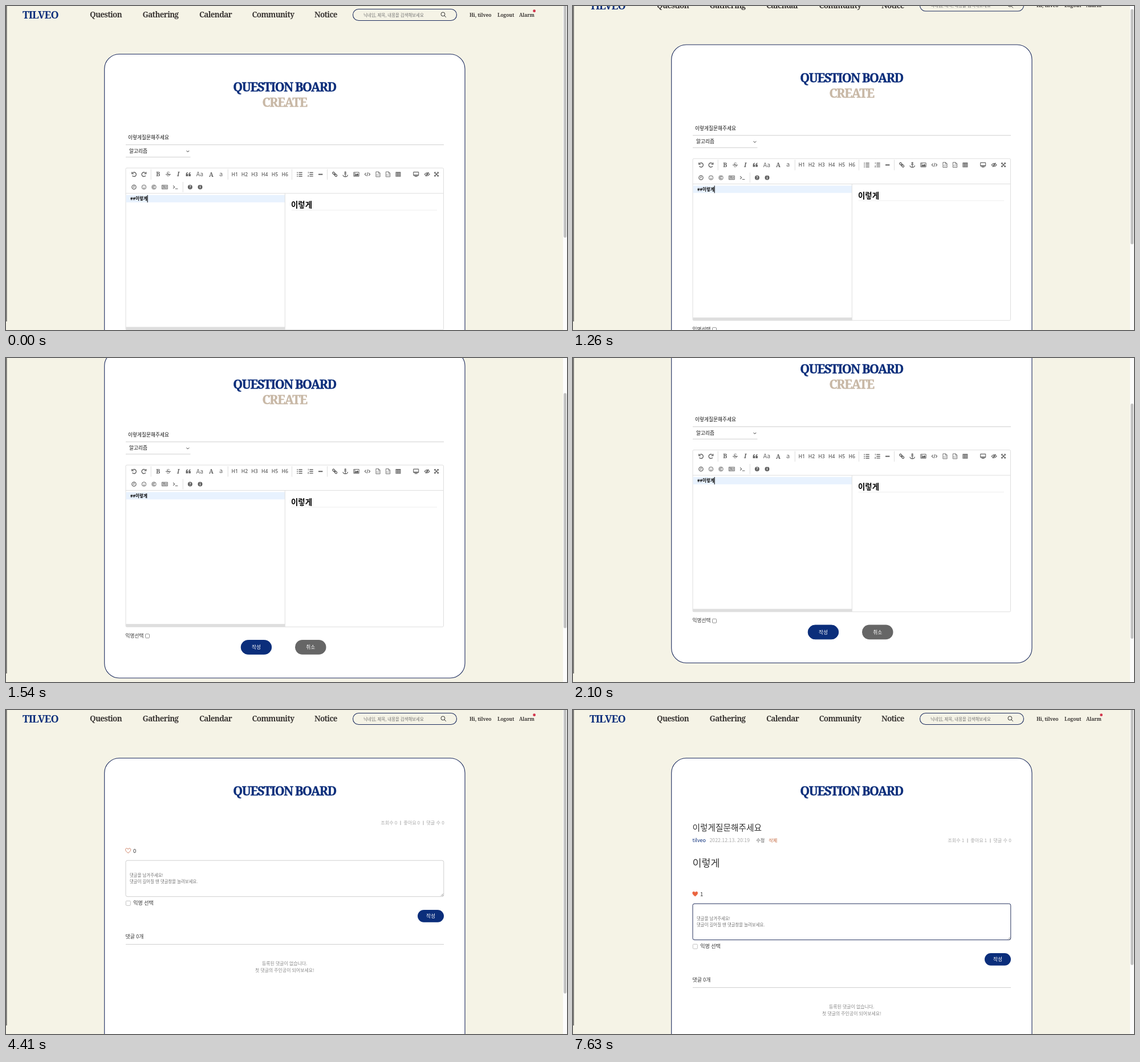
An HTML page for the animation above (8 s loop, 984 by 569 pixels).

```html
<!DOCTYPE html>
<html lang="ko">
<head>
<meta charset="utf-8">
<title>Question board</title>
<style>
@property --scroll { syntax: "<number>"; inherits: true; initial-value: 0; }
:root { --navy: #0b2e7b; --ink: #3b3735; --rule: #cfcfcf; --loop: 8s step-end infinite; }
html, body { margin: 0; width: 100%; height: 100%; overflow: hidden; background: #f5f3e6; }
svg { display: block; width: 984px; height: 569px; animation: scroll var(--loop); }
text { font-family: "Noto Sans CJK KR", "Noto Sans CJK", "Noto Sans", sans-serif; white-space: pre; }

/* type */
.slab text, text.slab { font-family: "Noto Serif", serif; font-weight: 700; fill: var(--ink); }
.nav text { font-size: 13.5px; letter-spacing: -.68px; }
.user text { font-size: 8.5px; letter-spacing: -.1px; }
text.logo { font-size: 18px; letter-spacing: -.95px; fill: var(--navy); }
text.head { font-size: 21.5px; letter-spacing: -1.4px; text-anchor: middle; fill: var(--navy); stroke: var(--navy); stroke-width: .4px; }
text.sub { fill: #c8b8a6; stroke: #c8b8a6; }
.t7 { font-size: 7.42px; fill: #757575; }
.t8 { font-size: 8.7px; fill: #111; }
.meta { font-size: 8.2px; fill: #a9a9a9; }
.empty { font-size: 7.9px; fill: #8a8a8a; text-anchor: middle; }
.mid { text-anchor: middle; }
.bold { font-weight: 700; }

/* shapes */
.line { fill: none; stroke: var(--rule); }
.frame { fill: none; stroke: #dedede; }
.edge { stroke: #1c2b5e; stroke-width: 1.1px; }
.icons { fill: none; stroke: #636363; stroke-width: 1.1px; }
.icons .f { fill: #636363; stroke: none; }
.icons .w { fill: #fff; stroke: none; font-size: 6.5px; font-weight: 700; text-anchor: middle; }
.icons text.f { text-anchor: middle; }
.icons .s { font-family: "Noto Serif", serif; font-size: 10.5px; }
.icons .h text { font: 600 8.6px "Open Sans", "Noto Sans", sans-serif; fill: #636363; stroke: none; text-anchor: middle; }

/* motion */
.page { transform: translateY(calc(-1px * var(--scroll))); }
.thumb { fill: #c1c1c1; transform: translateY(calc(.7px * var(--scroll))); animation: thumb var(--loop); }
.write { animation: write var(--loop); }
.read { animation: read var(--loop); }
.loaded { animation: loaded var(--loop); }
.counts { animation: counts var(--loop); }
.lower { animation: lower var(--loop); }
.caret { animation: caret var(--loop); }
.box { fill: #fff; stroke: #767676; stroke-width: .8px; animation: box var(--loop); }
.tick { animation: tick var(--loop); }
.submit { fill: var(--navy); stroke: var(--navy); animation: submit var(--loop); }
.submit-label { fill: #fff; animation: label var(--loop); }
.before { animation: before var(--loop); }
.after { animation: after var(--loop); }
.area { fill: #fff; stroke: #cfcfcf; animation: area var(--loop); }
.caret2 { animation: caret2 var(--loop); }

@keyframes scroll {
  0% { --scroll: 0; } 14.875% { --scroll: 5; } 15.75% { --scroll: 16.5; } 16.625% { --scroll: 37; }
  17.5% { --scroll: 59; } 18.375% { --scroll: 80; } 19.25% { --scroll: 96.5; } 20.125% { --scroll: 112; }
  21% { --scroll: 123; } 55.125%, 100% { --scroll: 0; }
}
@keyframes thumb { 0% { height: 413px; } 55.125% { height: 504px; } 69.125%, 100% { height: 454px; } }
@keyframes write { 0% { visibility: visible; } 55.125%, 100% { visibility: hidden; } }
@keyframes read { 0% { opacity: 0; } 55.125%, 100% { opacity: 1; } }
@keyframes loaded { 0% { opacity: 0; } 69.125%, 100% { opacity: 1; } }
@keyframes counts { 0% { transform: translateY(-31px); } 69.125%, 100% { transform: none; } }
@keyframes lower { 0% { transform: translateY(-76px); } 69.125%, 100% { transform: none; } }
@keyframes caret {
  0%, 9.625%, 23.625% { opacity: 1; }
  2.625%, 16.625%, 28.875%, 100% { opacity: 0; }
}
@keyframes box {
  0%, 26.25%, 44.625%, 100% { stroke: #767676; fill: #fff; }
  25.375%, 30.625%, 41.125% { stroke: #4f4f4f; fill: #fff; }
  34.125% { stroke: #0067e0; fill: #0067e0; }
  35% { stroke: #005cc8; fill: #005cc8; }
}
@keyframes tick { 0%, 41.125%, 100% { opacity: 0; } 34.125% { opacity: 1; } }
@keyframes submit { 0% { fill: #0b2e7b; } 49% { fill: #3d5895; } 49.875% { fill: #b4bfd6; } 50.75%, 100% { fill: #fff; } }
@keyframes label { 0% { fill: #fff; } 49% { fill: #ccd4e4; } 49.875% { fill: #546ca2; } 50.75%, 100% { fill: #0b2e7b; } }
@keyframes before { 0% { opacity: 1; } 84.875%, 100% { opacity: 0; } }
@keyframes after { 0% { opacity: 0; } 84.875%, 100% { opacity: 1; } }
@keyframes area { 0% { stroke: #cfcfcf; } 89.25% { stroke: #a3a9bb; } 90.125% { stroke: #5f6b8e; } 91%, 100% { stroke: #26335f; } }
@keyframes caret2 { 0%, 95.375%, 100% { opacity: 0; } 89.25% { opacity: 1; } }
</style>
</head>
<body>
<svg viewBox="0 0 984 569">
  <defs>
    <path id="undo" d="M-2.6-2.2A3.7 3.7 0 1 1-2.9 2.3M-3.7-4v3.1h3.1" stroke-width="1.4"/>
    <path id="heart" d="M0 4.2C-6.5-.3-4.9-4.1-2.4-4.1-1-4.1 0-3 0-2.3 0-3 1-4.1 2.4-4.1 4.9-4.1 6.5-.3 0 4.2Z"/>
    <g id="file">
      <path d="M-3.6-4.4H1.2L3.6-2V4.4H-3.6ZM1-4.2V-1.8H3.4" stroke-width=".9"/>
      <path d="M-.7-.4-2 1.2-.7 2.8M.7-.4 2 1.2.7 2.8" stroke-width=".8"/>
    </g>
  </defs>

  <g class="page">
    <g class="slab">
      <text class="logo" x="29" y="22">TILVEO</text>
      <g class="nav">
        <text x="147" y="20">Question</text>
        <text x="239.5" y="20">Gathering</text>
        <text x="339" y="20">Calendar</text>
        <text x="431.5" y="20">Community</text>
        <text x="541" y="20">Notice</text>
      </g>
      <g class="user">
        <text x="813" y="18.5">Hi, tilveo</text>
        <text x="862" y="18.5">Logout</text>
        <text x="900" y="18.5">Alarm</text>
      </g>
    </g>
    <rect class="edge" x="608.5" y="5.5" width="182" height="20" rx="10" fill="none"/>
    <text class="t7" x="627" y="18.6">닉네임, 제목, 내용을 검색해보세요</text>
    <path d="M769.8 14.4a3.4 3.4 0 1 1-6.8 0a3.4 3.4 0 1 1 6.8 0M768.9 16.9l3 3" fill="none" stroke="#333"/>
    <circle cx="926.6" cy="8.7" r="2.4" fill="#d2334b"/>

    <rect class="edge" x="172.7" y="84.5" width="632.3" height="574" rx="26" fill="#fff"/>
    <text class="slab head" x="488.5" y="150.2">QUESTION BOARD</text>

    <g class="write">
      <text class="slab head sub" x="488.5" y="177.4">CREATE</text>
      <text class="t8" x="214" y="234.4">이렇게질문해주세요</text>
      <path class="line" d="M210 243.7H768M210 265.3H323.5"/>
      <text class="t8" x="216" y="257.5">알고리즘</text>
      <path d="M316.6 254l2.3 2.3 2.3-2.3" fill="none" stroke="#333"/>

      <rect class="frame" x="210" y="284.5" width="557.5" height="284.2" rx="2"/>
      <path class="frame" d="M210 329H767.5M254.3 286.5V305M389.3 286.5V305M501.5 286.5V305M563.5 286.5V305M310.3 309V327"/>

      <g class="icons">
        <use href="#undo" x="224.5" y="295.5"/>
        <use href="#undo" transform="translate(242 295.5) scale(-1 1)"/>
        <text class="f s bold" x="266.8" y="299.3">B</text>
        <text class="f s" x="284.5" y="299.3">S</text>
        <path d="M280 295.8h9"/>
        <text class="f s bold" x="302" y="299.3" font-style="italic">I</text>
        <path class="f" d="M315.6 295.5q0-3.2 3.4-3.6v1.2q-1.6.4-1.6 2h1.8v4h-3.6ZM320.3 295.5q0-3.2 3.4-3.6v1.2q-1.6.4-1.6 2h1.8v4h-3.6Z"/>
        <text class="f" x="339.8" y="299" font-size="10.3">Aa</text>
        <text class="f s bold" x="360" y="299.5">A</text>
        <text class="f" x="377.2" y="298.8" font-size="11">a</text>
        <g class="h">
          <text x="401.3" y="298.6">H1</text>
          <text x="418.4" y="298.6">H2</text>
          <text x="436" y="298.6">H3</text>
          <text x="453.7" y="298.6">H4</text>
          <text x="471.4" y="298.6">H5</text>
          <text x="489.2" y="298.6">H6</text>
        </g>
        <path d="M510.3 292.5h1.6M510.3 295.7h1.6M510.3 298.9h1.6M513.4 292.5h6.3M513.4 295.7h6.3M513.4 298.9h6.3" stroke-width="1.5"/>
        <path d="M532.4 292.5h6.3M532.4 295.7h6.3M532.4 298.9h6.3" stroke-width="1.4"/>
        <path d="M530.3 291v3M529.3 297.3h1.6l-1.4 2.2h1.6" stroke-width=".8"/>
        <path d="M548 295.7h7.4" stroke-width="2"/>
        <g transform="translate(576.7 295.5) rotate(45)" stroke-width="1.3">
          <rect x="-4.8" y="-1.6" width="4.6" height="3.2" rx="1.4"/>
          <rect x=".2" y="-1.6" width="4.6" height="3.2" rx="1.4"/>
          <path d="M-1.8 0h3.6"/>
        </g>
        <path d="M595.2 293.2v6.3M593 295h4.4M590.9 296.6q.5 3.2 4.3 3.2t4.3-3.2M596.3 292.2a1.1 1.1 0 1 1-2.2 0a1.1 1.1 0 1 1 2.2 0" stroke-width="1.2"/>
        <rect x="609.9" y="292" width="9.2" height="7.2" rx=".6"/>
        <path class="f" d="M611 298.2v-1.6l1.8-1.7 1.2 1.1 2.1-2.2 2 2v2.4ZM611.2 294a.9.9 0 1 0 1.8 0a.9.9 0 1 0-1.8 0"/>
        <path d="M631.6 293.2l-2.3 2.4 2.3 2.4M636.2 293.2l2.3 2.4-2.3 2.4M634.7 292.2l-1.6 6.8"/>
        <use href="#file" x="652.5" y="295.5"/>
        <use href="#file" x="670" y="295.5"/>
        <path d="M684 292h7.8v7.3H684ZM684 292.6h7.8M684 295h7.8M684 297.2h7.8M686.6 292v7.3M689.2 292v7.3"/>
        <rect x="714.7" y="291.6" width="9" height="6" rx=".6"/>
        <path d="M715 296.9h8.5M716.7 299.4h5" stroke-width="1.3"/>
        <path d="M734.2 295.6q4.4-5.4 8.8 0q-4.4 5.2-8.8 0ZM736 299.3l5.4-7.4"/>
        <circle class="f" cx="738.8" cy="295.4" r="1.6"/>
        <path d="M752 292.5l6 6M758 292.5l-6 6" stroke-width="1.4"/>
        <path class="f" d="M751.2 291.6h3.1l-3.1 3.1ZM758.9 291.6v3.1l-3.1-3.1ZM751.2 299.4v-3.1l3.1 3.1ZM758.9 299.4h-3.1l3.1-3.1Z"/>

        <circle cx="224.5" cy="318" r="3.6" stroke-width="1.3"/>
        <path d="M224.6 315.8v2.4h-1.7"/>
        <circle cx="242" cy="318" r="3.8" stroke-width=".9"/>
        <path d="M240 319q2 2.3 4 0M240.6 316v1.2M243.4 316v1.2" stroke-width=".9"/>
        <circle cx="259.5" cy="318" r="3.8" stroke-width=".9"/>
        <path d="M261.1 317a1.9 1.9 0 1 0 0 2"/>
        <path d="M273.4 314.7h10v6.6h-10ZM275.2 314.7v6.6M279.8 316.5h2.6M279.8 318h2.6M276.4 319.7h6" stroke-width=".9"/>
        <rect x="276.7" y="316.2" width="2" height="2" stroke-width=".9"/>
        <path d="M293.2 315.4l2.5 2.5-2.5 2.5M296.8 321h4.6"/>
        <circle class="f" cx="322.9" cy="318" r="4"/>
        <text class="w" x="322.9" y="320.4">?</text>
        <circle class="f" cx="340.5" cy="318" r="4"/>
        <text class="w" x="340.5" y="320.3">i</text>
      </g>

      <rect x="210.5" y="332" width="278.7" height="12.8" fill="#e8f2fe"/>
      <rect x="210.3" y="563.6" width="279" height="5" fill="#dedede"/>
      <path class="frame" d="M489.3 329V568.6"/>
      <text class="bold" x="218" y="341" font-size="7.6">##이렇게</text>
      <path class="caret" d="M248.2 332V345" stroke="#000"/>
      <text class="bold" x="500" y="354" font-size="13.4">이렇게</text>
      <path d="M500.5 358.4H756" stroke="#eee"/>

      <text class="t8" x="209.5" y="587.4" style="fill:#333">익명선택</text>
      <rect class="box" x="244.5" y="581.2" width="7" height="7" rx="1.2"/>
      <path class="tick" d="M246 584.8l1.5 1.6 2.7-3.4" fill="none" stroke="#fff"/>
      <rect class="submit" x="412.2" y="592" width="53.5" height="24.8" rx="12.4"/>
      <text class="t8 mid submit-label" x="438.9" y="607.5">작성</text>
      <rect x="507" y="591.5" width="54.5" height="25.8" rx="12.9" fill="#666"/>
      <text class="t8 mid" x="534.2" y="607.5" style="fill:#fff">취소</text>
    </g>

    <g class="read">
      <g class="loaded">
        <text x="209.5" y="212" font-size="14.7" font-weight="500" fill="#333">이렇게질문해주세요</text>
        <text x="209.5" y="232.2" font-size="9" fill="#0b2e7b">tilveo</text>
        <text class="meta" x="239.5" y="232.2" style="font-size:8.75px">2022.12.13. 20:19</text>
        <text class="meta" x="321.3" y="232.2" style="fill:#555">수정</text>
        <text class="meta" x="343.2" y="232.2" style="fill:#c4683f">삭제</text>
        <text x="209.5" y="275.4" font-size="17.4" fill="#333">이렇게</text>
      </g>
      <g class="meta counts">
        <text x="657.3" y="232.2">조회수</text>
        <text x="697.2" y="232.2">좋아요</text>
        <text x="737.2" y="232.2">댓글 수 0</text>
        <path d="M692 225.6v7.4M732 225.6v7.4" stroke="#999" stroke-width=".9"/>
        <g class="before"><text x="681.7" y="232.2">0</text><text x="721.6" y="232.2">0</text></g>
        <g class="after"><text x="681.7" y="232.2">1</text><text x="721.6" y="232.2">1</text></g>
      </g>
      <g class="lower">
        <g class="before">
          <use href="#heart" x="214.2" y="323" fill="none" stroke="#c8704e" stroke-width=".9"/>
          <text x="223" y="326.8" font-size="9.6" fill="#333">0</text>
        </g>
        <g class="after">
          <use href="#heart" x="214.2" y="323" fill="#ea643f" stroke="#ea643f" stroke-width=".5"/>
          <text x="223" y="326.8" font-size="9.6" fill="#333">1</text>
        </g>
        <rect class="area" x="210" y="340.2" width="557.8" height="63.5" rx="3"/>
        <path class="caret2" d="M217.5 345V356" stroke="#222"/>
        <text class="t7" x="217" y="368.6">댓글을 남겨주세요!</text>
        <text class="t7" x="217" y="380">댓글이 길어질 땐 댓글창을 늘려보세요.</text>
        <path d="M763 402.6l4-4M765.4 402.6l1.6-1.6" stroke="#777" stroke-width=".8"/>
        <rect x="210.3" y="411.3" width="8" height="8" rx="1.2" fill="#fff" stroke="#bbb" stroke-width=".9"/>
        <text x="223.2" y="418.4" font-size="9" fill="#333">익명 선택</text>
        <rect x="722" y="427" width="46" height="21.7" rx="10.85" fill="#0b2e7b"/>
        <text class="t8 mid" x="745" y="440.9" style="fill:#fff">작성</text>
        <text x="209.5" y="476.8" font-size="8.9" fill="#333">댓글 0개</text>
        <path class="line" d="M210 487.5H768"/>
        <text class="empty" x="488.7" y="523.8">등록된 댓글이 없습니다.</text>
        <text class="empty" x="488.7" y="536">첫 댓글의 주인공이 되어보세요!</text>
      </g>
    </g>
  </g>

  <rect width="1.6" height="554" fill="#6c6b69"/>
  <rect x="977" width="7" height="569" fill="#fcfcfc"/>
  <rect class="thumb" x="978.2" y="-6" width="4.8" height="413" rx="2.4"/>
</svg>
</body>
</html>
```
